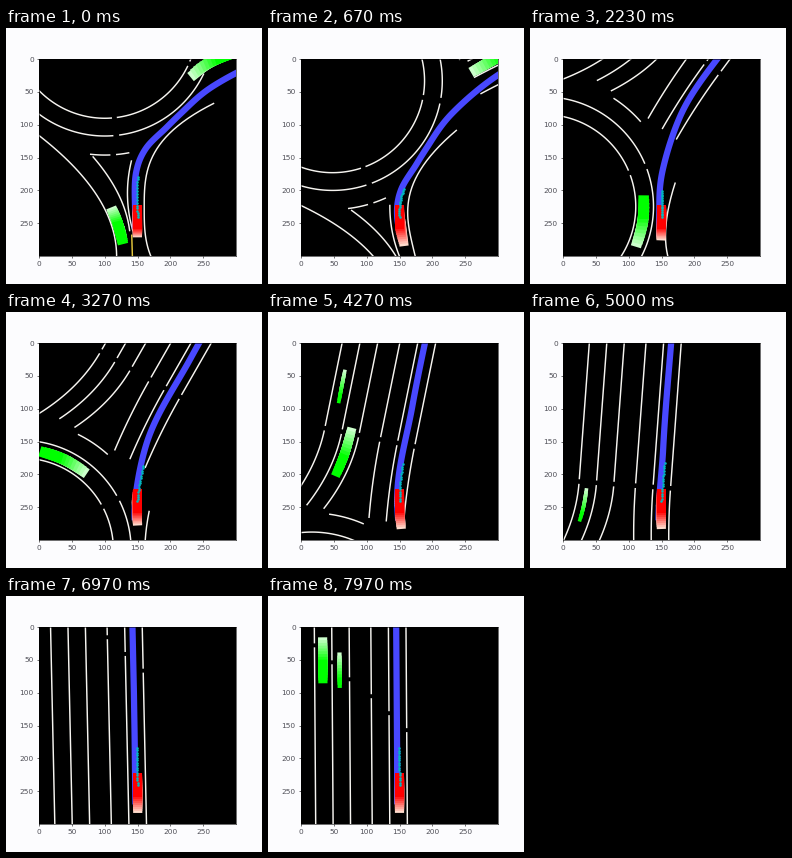
Recreate the animation shown at these times as a matplotlib script. Size 256 by 256 pixels, loop 8000 ms.

```python
import numpy as np
import matplotlib.pyplot as plt
from matplotlib.animation import FuncAnimation
from matplotlib.collections import PolyCollection
from matplotlib.transforms import Affine2D

FRAMES, LOOP = 240, 8000
EGO = (150, 240)          # place of the driven car in the view
SOUTH = -82               # turn of the southern arm against the exit road
INNER, OUTER, ISLAND, RING_LANE = 140, 167, 196, 153
FORK = -322               # where the exit road starts to bend
STEPS = 9                 # boxes in the fading trail of a car

# World: roundabout centre at (0, 0), exit road runs straight up (y points down).


def hermite(t, knots, vals, slopes):
    i = np.clip(np.searchsorted(knots, t, side="right") - 1, 0, len(knots) - 2)
    h = (knots[i + 1] - knots[i])[:, None]
    u = (t - knots[i])[:, None] / h
    return ((1 + 2 * u) * (1 - u) ** 2 * vals[i] + u * (1 - u) ** 2 * h * slopes[i]
            + u * u * (3 - 2 * u) * vals[i + 1] + u * u * (u - 1) * h * slopes[i + 1])


def lengths(pts):
    return np.r_[0, np.cumsum(np.hypot(*np.diff(pts, axis=0).T))]


def curve(pts, step=4):
    """Smooth line through a few points."""
    pts = np.array(pts, float)
    d = lengths(pts)
    s = np.linspace(0, d[-1], int(d[-1] / step) + 2)
    return hermite(s, d, pts, np.gradient(pts, d, axis=0))


def turn(pts, deg=SOUTH):
    return Affine2D().rotate_deg(deg).transform(np.array(pts, float))


def arc(r, a0, a1, n=60):
    """Arc with angles clockwise from straight up."""
    a = np.radians(np.linspace(a0, a1, n))
    return np.c_[r * np.sin(a), -r * np.cos(a)]


def flare(x, y, k, power, y0, y1, n=50):
    """Upright line at x that swings aside with the distance from height y."""
    ys = np.linspace(y0, y1, n)
    return np.c_[x + k * np.abs(ys - y) ** power, ys]


class Route:
    def __init__(self, pts):
        self.pts = pts
        self.dist = lengths(pts)

    def at(self, s):
        return np.c_[np.interp(s, self.dist, self.pts[:, 0]),
                     np.interp(s, self.dist, self.pts[:, 1])]

    def near(self, p):
        s = np.linspace(0, self.dist[-1], 4000)
        return s[np.argmin(np.hypot(*(self.at(s) - p).T))]


# ---- driven car: time, x, y, heading
KEYS = np.array([
    (-0.4, 312, -6, -82), (0, 294, -9, -82), (0.667, 230, -19, -68.5),
    (1.23, 196, -38, -47), (1.8, 169, -73, -34), (2.233, 152, -96, -36.7),
    (3.267, 116, -153, -29.8), (4.267, 88, -237, -11.5), (5.867, 82, -382, 0),
    (7.967, 82.5, -572, 0.4), (9, 83, -665, 0.4)])
TIMES, POSES = KEYS[:, 0], KEYS[:, 1:]
RATES = np.gradient(POSES, TIMES, axis=0)


def pose(t):
    p = hermite(np.atleast_1d(t), TIMES, POSES, RATES)
    return p[:, :2], p[:, 2]


def box(p, heading, length, width):
    a = np.radians(heading)
    f = np.array([np.sin(a), -np.cos(a)]) * length / 2
    r = np.array([np.cos(a), np.sin(a)]) * width / 2
    return np.array([p + f + r, p + f - r, p - f - r, p - f + r])


# ---- stage
fig, ax = plt.subplots(figsize=(5.12, 5.12), dpi=50, facecolor="#fcfcfe")
ax.set_facecolor("black")
ax.set_aspect("equal")
ax.set_xlim(-0.5, 299.5)
ax.set_ylim(299.5, -0.5)
ax.set_xticks(range(0, 300, 50))
ax.set_yticks(range(0, 300, 50))
ax.tick_params(labelsize=10.6, labelcolor="#505058")
ax.set_autoscale_on(False)
world = Affine2D()
view = world + ax.transData


def lane(pts, color="#f6f4f0"):
    ax.plot(*np.transpose(pts), color=color, lw=2.1, transform=view,
            solid_capstyle="butt", zorder=1)


# circles of the roundabout, broken by small gaps, and tips of the islands
for radius in (INNER, OUTER):
    for a in range(-28, 332, 60):
        lane(arc(radius, a + 1.5, a + 58.5))
for a0, a1 in ((87, 93), (95.5, 104.6), (-3.8, 12.3)):
    lane(arc(ISLAND, a0, a1))

# southern arm: right edge, both sides of the island, left edge
for shape in ((60, 277, 2.6e-5, 3, 400, 117), (34.5, 254, 0.0025, 2, 312, 204),
              (39, 330, -0.0033, 2, 312, 198), (18, 350, -0.0035, 2, 390, 130)):
    lane(turn(flare(*shape)))
lane(turn([(41, 317), (42, 350), (46, 430)]), "#e6c83c")

# exit road: two groups of three lines
lefts, rights = -45.5 + 26.5 * np.arange(3), 40.5 + 26.75 * np.arange(3)
for x, gap in zip([*lefts, *rights], np.linspace(-785, -655, 6)):
    lane([(x, -1200), (x, gap - 3)])
    lane([(x, gap + 3), (x, FORK - 4)])
    k = -0.0021 if x < 20 else 0.0005
    lane(flare(x, FORK, k, 2, FORK + 3, FORK + (162 if x == lefts[0] else 120)))

# ---- planned route: slightly left of the driven way, then straight on
way, turned = pose(np.linspace(-0.4, 8.5, 300))
side = np.radians(turned)
plan = Route(np.r_[way - 3.6 * np.c_[np.cos(side), np.sin(side)], [(79, -1200)]])
route_line, = ax.plot([], [], color="#4848ff", lw=9, transform=view,
                      solid_capstyle="butt", zorder=2)
dots, = ax.plot([], [], "o", color="#00b9be", ms=3.7, mew=0, transform=view, zorder=5)


def trail(light, full, z):
    k = np.linspace(0, 1, STEPS)[:, None]
    c = PolyCollection([], facecolors=np.array(light) * (1 - k) + np.array(full) * k,
                       edgecolors="none", transform=view, zorder=z)
    ax.add_collection(c, autolim=False)
    return c


ego = trail((1, 0.86, 0.8), (1, 0, 0), 4)


class Car:
    """Car on a fixed route; `rear` is the end of its trail at time t0."""

    def __init__(self, pts, t0, rear, speed, total, length=36, width=14):
        self.route = Route(pts)
        self.t0, self.speed = t0, speed
        self.s0 = self.route.near(rear)
        self.total, self.length, self.width = total, length, width
        self.art = trail((0.8, 1, 0.8), (0, 1, 0), 3)

    def draw(self, t):
        rear = self.s0 + self.speed * (t - self.t0)
        half = self.length / 2
        mids = rear + half + np.linspace(0, self.total - self.length, STEPS)
        a, b = self.route.at(mids - half), self.route.at(mids + half)
        d = b - a
        heads = np.degrees(np.arctan2(d[:, 0], -d[:, 1]))
        self.art.set_verts([box(p, h, self.length, self.width)
                            for p, h in zip((a + b) / 2, heads)])


def oncoming(x):
    """Down the exit road and into the roundabout."""
    return curve(np.r_[[(x, -2000), (x, -400)],
                       flare(x, FORK, -0.0021, 2, FORK, FORK + 115, 4),
                       arc(RING_LANE, -38, -120, 5)])


leaving = turn(np.r_[flare(29, 350, -0.0035, 2, 150, 350), [(60, 560)]])
exiting = curve(np.r_[arc(RING_LANE, 80, 36, 4),
                      [(62, -225), (54, -320), (54, -500), (54, -1600)]])
cars = [
    Car(leaving, 0, turn([(11, 275)])[0], 90, 59, width=16),
    Car(exiting, 0, arc(RING_LANE, 38.6, 0)[0], 133, 82, width=16),
    Car(arc(RING_LANE, 250, -160, 300), 2.233, arc(RING_LANE, 75, 0)[0], 166, 80, width=16),
    Car(oncoming(-5.5), 4.267, (-6, -331), 155, 78),
    Car(oncoming(-33), 4.267, (-33, -416), 140, 52, 16, 5.5),
    Car(oncoming(-33), 7.967, (-33, -797), 115, 70),
    Car(oncoming(-7.5), 7.967, (-7.5, -774), 125, 54, 16, 6.5)]


def draw(i):
    t = i * LOOP / FRAMES / 1000
    pos, head = pose(t)
    world.clear().translate(*-pos[0]).rotate_deg(-head[0]).translate(*EGO)

    s = plan.near(pos[0])
    route_line.set_data(*plan.at(np.arange(s - 30, s + 420, 4)).T)
    ego.set_verts([box(p, h, 37, 14)
                   for p, h in zip(*pose(t - np.linspace(0.27, 0, STEPS)))])
    dots.set_data(*pose(t + np.linspace(-0.01, 0.62, 16))[0].T)
    for car in cars:
        car.draw(t)
    return []


anim = FuncAnimation(fig, draw, frames=FRAMES, interval=LOOP / FRAMES,
                     init_func=lambda: draw(0), repeat=True, repeat_delay=0)
plt.show()
```
